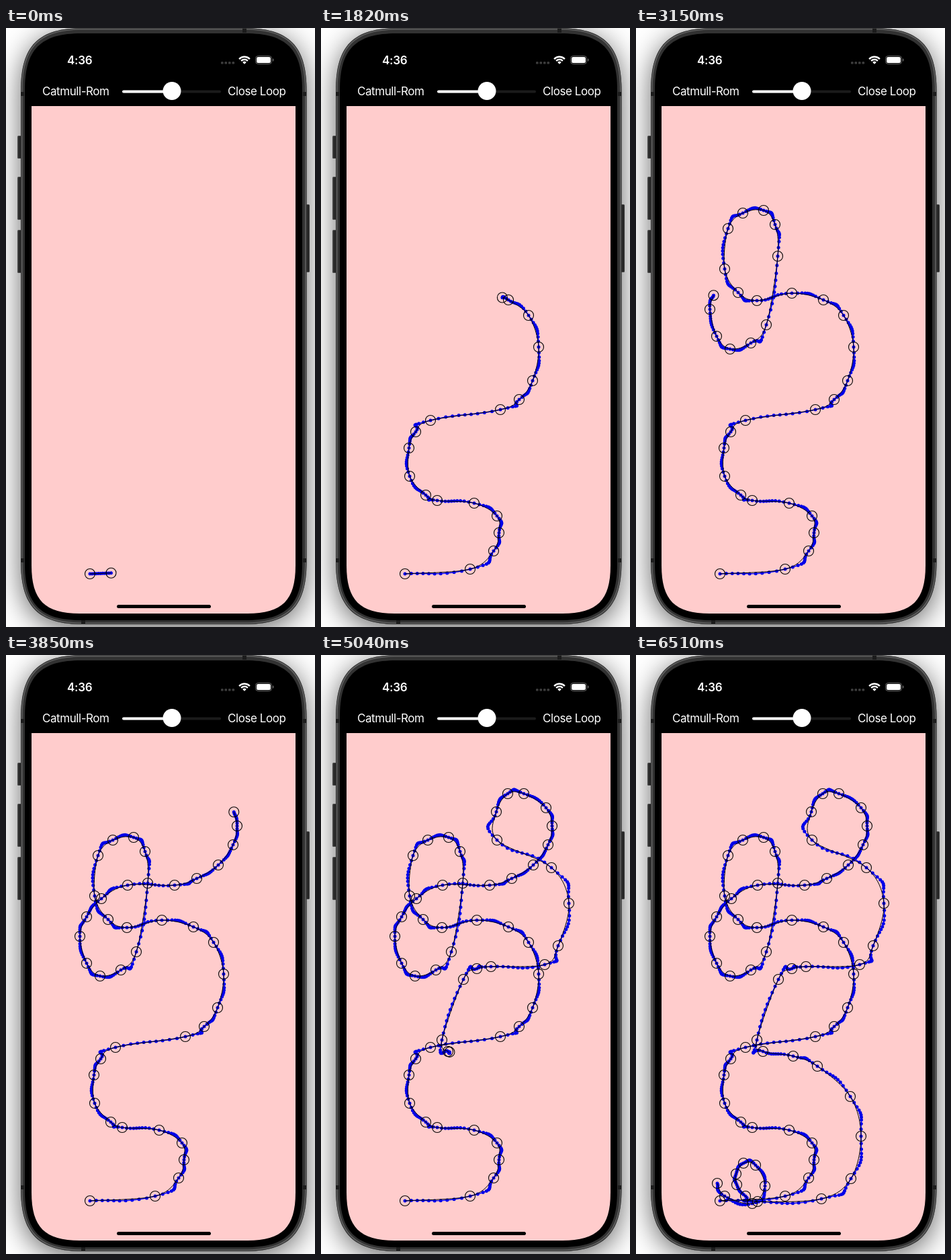
Recreate the animation shown at these times as an HTML page with a canvas. Size 460 by 890 pixels, loop 8000 ms.

```html
<!DOCTYPE html>
<html lang="en">
<head>
<meta charset="utf-8">
<title>Catmull-Rom drawing</title>
<style>
html, body { margin: 0; width: 100%; height: 100%; overflow: hidden; background: #fff; }
canvas { display: block; width: 460px; height: 890px; }
</style>
</head>
<body>
<canvas id="stage" width="460" height="890"></canvas>
<script>
const ctx = document.getElementById('stage').getContext('2d');
const LOOP = 8000, STEP = 70, DRAW_END = 6510, DOTS = 10;

// Control points as x, y pairs.
const coords = [
  125,811, 222,804, 257,777, 265,750, 262,725, 228,706, 173,702, 156,694, 132,666, 131,624,
  141,600, 163,583, 267,567, 295,552, 315,524, 324,474, 309,427, 279,404, 232,394, 180,405,
  152,393, 132,358, 137,298, 159,275, 190,271, 207,292, 211,339, 194,441, 171,468, 140,477,
  120,458, 110,418, 120,389, 142,362, 181,342, 251,342, 284,332, 316,312, 338,282, 344,254,
  335,227, 302,206, 278,206, 261,233, 262,275, 343,316, 369,369, 353,432, 333,460, 253,463,
  232,466, 212,482, 180,572, 189,589, 234,596, 270,611, 319,656, 335,715, 320,778, 276,808,
  181,812, 163,804, 150,787, 149,771, 160,755, 178,758, 192,789, 173,815, 132,804, 121,785
];
const points = [];
for (let i = 0; i < coords.length; i += 2) points.push([coords[i], coords[i + 1]]);

// Pen progress: time in ms, position in control points.
const pace = [[0, .37], [770, 5.46], [1820, 17.22], [3150, 31.7], [4480, 47], [5530, 58.4], [DRAW_END, 69]];

function progressAt(time) {
  for (let i = 1; i < pace.length; i++) {
    const [t0, u0] = pace[i - 1], [t1, u1] = pace[i];
    if (time <= t1) return u0 + (u1 - u0) * (time - t0) / (t1 - t0);
  }
  return points.length - 1;
}

// Cardinal spline through pts between i and i + 1.
function spline(pts, i, f, tension) {
  const last = pts.length - 1;
  const a = pts[Math.max(i - 1, 0)], b = pts[i];
  const c = pts[Math.min(i + 1, last)], d = pts[Math.min(i + 2, last)];
  const g = 1 - f;
  return [0, 1].map(k =>
    b[k] * g * g * (1 + 2 * f) + c[k] * f * f * (3 - 2 * f) +
    tension * ((c[k] - a[k]) * f * g * g - (d[k] - b[k]) * f * f * g));
}

function sample(pts, tension) {
  const out = [];
  for (let i = 0; i < pts.length - 1; i++)
    for (let j = 0; j < DOTS; j++) out.push(spline(pts, i, j / DOTS, tension));
  out.push(pts[pts.length - 1]);
  return out;
}

function polyline(pts, color, width) {
  ctx.beginPath();
  pts.forEach(p => ctx.lineTo(...p));
  ctx.strokeStyle = color;
  ctx.lineWidth = width;
  ctx.stroke();
}

function disc(x, y, r, color) {
  ctx.beginPath();
  ctx.arc(x, y, r, 0, 7);
  ctx.fillStyle = color;
  ctx.fill();
}

function pill(x, y, w, h, r, color) {
  ctx.beginPath();
  ctx.roundRect(x, y, w, h, r);
  ctx.fillStyle = color;
  ctx.fill();
}

// Rectangle with continuous-curvature corners.
function smoothRect(x, y, w, h, r, color, squareTop) {
  const d = 1.3 * r, c = .36 * r, X = x + w, Y = y + h;
  ctx.beginPath();
  if (squareTop) {
    ctx.moveTo(x, y);
    ctx.lineTo(X, y);
  } else {
    ctx.moveTo(x, y + d);
    ctx.bezierCurveTo(x, y + c, x + c, y, x + d, y);
    ctx.lineTo(X - d, y);
    ctx.bezierCurveTo(X - c, y, X, y + c, X, y + d);
  }
  ctx.lineTo(X, Y - d);
  ctx.bezierCurveTo(X, Y - c, X - c, Y, X - d, Y);
  ctx.lineTo(x + d, Y);
  ctx.bezierCurveTo(x + c, Y, x, Y - c, x, Y - d);
  ctx.closePath();
  ctx.fillStyle = color;
  ctx.fill();
}

function label(text, x, y, weight, spacing) {
  ctx.font = `${weight} 17px Inter, Roboto, sans-serif`;
  ctx.letterSpacing = spacing + 'px';
  ctx.fillStyle = '#fff';
  ctx.fillText(text, x, y);
}

function drawPhone() {
  ctx.fillStyle = '#fff';
  ctx.fillRect(0, 0, 460, 890);
  ctx.save();
  ctx.shadowColor = 'rgba(0,0,0,.6)';
  ctx.shadowBlur = 40;
  ctx.shadowOffsetY = 8;
  smoothRect(22, 0, 425.5, 886, 72, '#555');
  ctx.restore();

  for (const [x, y, h] of [[17, 160, 34], [17, 221, 64], [17, 300, 64], [446, 262, 101]]) {
    pill(x, y, 6, h, 1.5, '#484848');
    pill(x + 1.5, y + 1, 4, h - 2, 1, '#282828');
  }
  smoothRect(22, 0, 425.5, 886, 72, '#343434');
  smoothRect(23, 1, 423.5, 884, 71, '#606060');
  smoothRect(24.5, 2.5, 420.5, 881, 70, '#323232');
  ctx.fillStyle = '#1c1c1c';
  for (const x of [22, 442]) for (const y of [95, 788]) ctx.fillRect(x, y, 5, 6);
  ctx.fillRect(352, 1, 6, 6);
  ctx.fillRect(112, 880, 6, 5);
  smoothRect(28, 8, 413, 872, 65, '#000');
  smoothRect(38, 116, 393, 754, 55, '#ffcccc', true);
}

function drawControls() {
  label('4:36', 91, 53.5, 600, -.3);
  for (let i = 0; i < 4; i++) pill(320 + i * 5.5, 50, 3.6, 3.6, 1.2, '#3c3c3c');

  ctx.strokeStyle = '#fff';
  ctx.lineWidth = 2.5;
  for (const r of [10.8, 6.7]) {
    ctx.beginPath();
    ctx.arc(355, 53.5, r, -Math.PI * .76, -Math.PI * .24);
    ctx.stroke();
  }
  ctx.beginPath();
  ctx.moveTo(355, 53.8);
  ctx.arc(355, 53.5, 3.8, -Math.PI * .76, -Math.PI * .24);
  ctx.fillStyle = '#fff';
  ctx.fill();

  ctx.beginPath();
  ctx.roundRect(371.5, 41.5, 24, 12, 3.8);
  ctx.strokeStyle = '#666';
  ctx.lineWidth = 1;
  ctx.stroke();
  pill(373, 43, 21, 9, 2.5, '#fff');
  pill(397, 45.5, 1.4, 4, 1, '#666');

  label('Catmull-Rom', 54, 100, 400, -.43);
  label('Close Loop', 330, 100, 400, -.43);
  pill(173, 92.5, 147, 4, 2, '#1b1b1b');
  pill(173, 92.5, 74, 4, 2, '#fff');
  disc(247, 93.5, 13.5, '#fff');
}

function drawCurve(time) {
  const u = progressAt(time), i = Math.min(Math.floor(u), points.length - 2);
  const pts = points.slice(0, i + 1);
  if (u > i) pts.push(spline(points, i, u - i, .5));

  const loose = sample(pts, 1);
  polyline(loose, '#0000ff', 1.5);
  loose.forEach(([x, y]) => disc(x, y, 2.5, '#0000e8'));
  polyline(sample(pts, .5), '#000', 1);
  ctx.strokeStyle = '#000';
  ctx.lineWidth = 1.1;
  for (const [x, y] of pts) {
    ctx.beginPath();
    ctx.arc(x, y, 7.5, 0, 7);
    ctx.stroke();
  }
}

function frame() {
  const time = Math.min(Math.floor(performance.now() % LOOP / STEP) * STEP, DRAW_END);
  ctx.lineJoin = 'round';
  drawPhone();
  drawControls();
  drawCurve(time);
  pill(165, 857, 140, 5, 2.5, '#000');
  requestAnimationFrame(frame);
}
frame();
</script>
</body>
</html>
```
